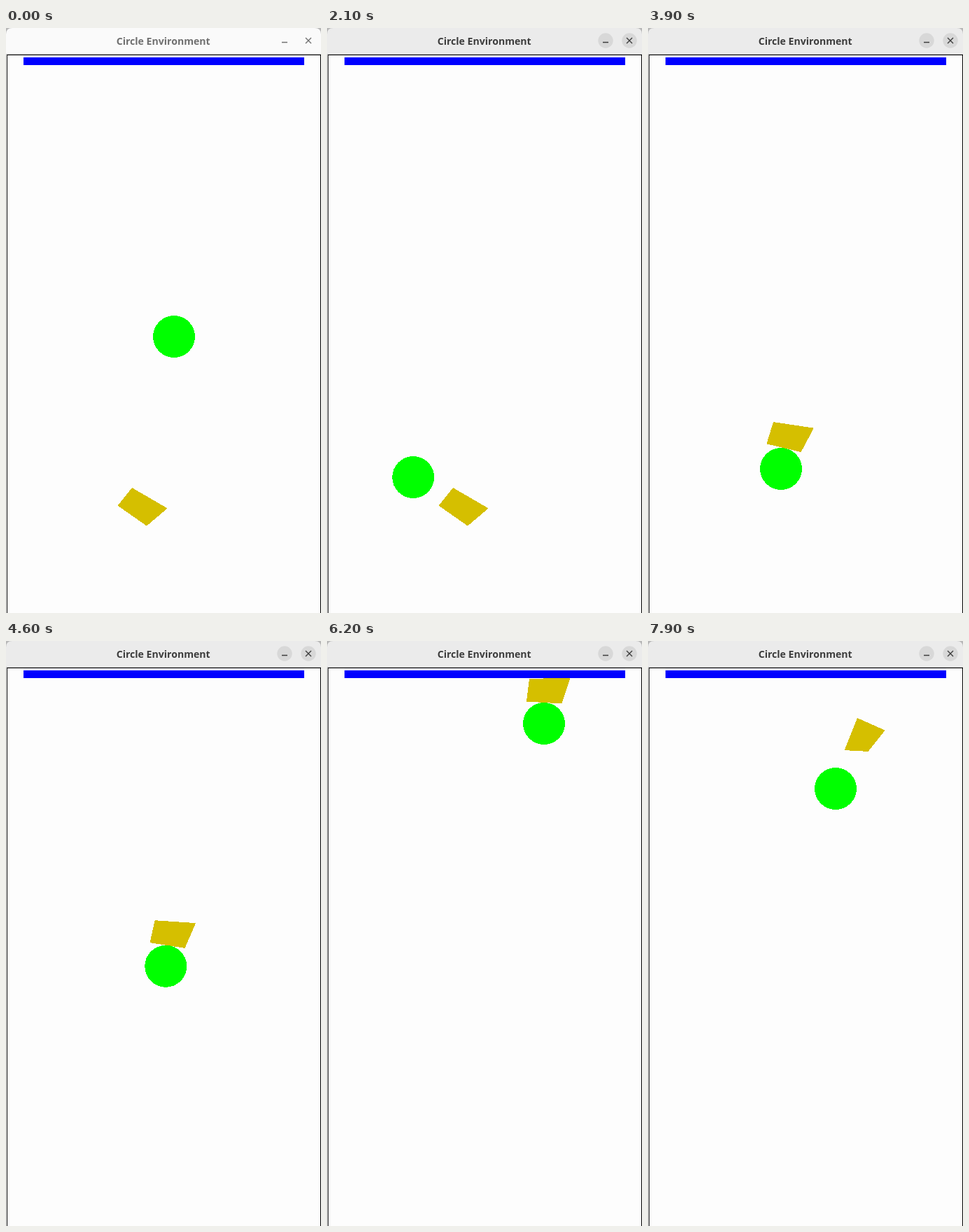
These frames come from a looping animation (450x836 px, 8000 ms). An HTML page:

```html
<!DOCTYPE html>
<html lang="en">
<head>
<meta charset="utf-8">
<title>Circle Environment</title>
<style>
  html, body { margin: 0; width: 100%; height: 100%; overflow: hidden; background: #fdfdfd; }
  svg { display: block; width: 450px; height: 836px; }
  text { font: bold 14.1px "Open Sans", "Noto Sans", sans-serif; text-anchor: middle; }
  .glyph { fill: none; stroke-width: 1.4; }
  .crisp { shape-rendering: crispEdges; }
</style>
</head>
<body>
<svg viewBox="0 0 450 836">
  <rect width="450" height="40" fill="#b8b8b8"/>
  <path id="bar" d="M0 38V9Q0 0 9 0H441Q450 0 450 9V38Z"/>
  <path d="M0 37.5H450" stroke="#c4c4c4"/>
  <g id="buttons" fill="#d8d8d8">
    <circle cx="398" cy="18" r="10.7"/>
    <circle cx="432" cy="18" r="10.7"/>
  </g>
  <text id="title" x="224.7" y="24">Circle Environment</text>
  <path id="glyphs" class="glyph" d="M394 20.5H402M428 14L436 22M436 14L428 22"/>
  <g class="crisp">
    <rect y="38" width="450" height="798" fill="#fdfdfd"/>
    <path d="M1.5 836V38.5H449.5V836" fill="none" stroke="#000"/>
    <rect x="25" y="42" width="401" height="11" fill="#00f"/>
    <polygon id="first" points="0,0 58.5,-1.5 46.5,35.5 -4,32.5" fill="#d5bf00"/>
    <polygon id="next" points="0,0 40.5,15.5 18,47 -16,47" fill="#d5bf00"/>
    <circle id="ball" r="30" fill="#0f0"/>
  </g>
</svg>
<script>
const LOOP = 8000, STEP = 100, RESET = 6400;
const el = id => document.getElementById(id);

// Turning points of the ball: [time, x, y].
const push = [
  [1000, 240, 441], [1500, 176, 510], [2250, 110, 675], [2650, 150, 762],
  [2700, 162, 755], [3330, 162, 763], [3900, 190, 630], [5400, 272, 276],
  [6060, 310, 118]
];
const retry = [
  [6400, 110, 207], [6900, 233, 116], [7100, 263, 117], [7400, 238, 150],
  [7900, 268, 211]
];
// Poses of the rigid blocks: [time, x, y, angle].
const lift = [[3480, 180, 657, 31.6], [3900, 179, 563, 10], [5400, 251, 212, 0], [6060, 289, 54, 0]];
const nudge = [[6900, 268, 108, 0], [7100, 299, 110, 3]];

const clamp = u => Math.min(1, Math.max(0, u));
const mix = (a, b, u) => a + (b - a) * u;

function sample(keys, t) {
  const next = keys.findIndex(k => k[0] > t);
  const b = keys.at(next), a = keys[Math.max(0, next - 1)];
  if (next < 1) return b.slice(1);
  const u = (t - a[0]) / (b[0] - a[0]);
  return a.slice(1).map((v, i) => mix(v, b[i + 1], u));
}

function place(id, [x, y, angle = 0]) {
  el(id).setAttribute("transform", `translate(${x} ${y}) rotate(${angle})`);
}

function grey(from, to, u) {
  const v = Math.round(mix(from, to, u));
  return `rgb(${v},${v},${v})`;
}

function draw(t) {
  const fresh = t >= RESET;
  place("ball", sample(fresh ? retry : push, t));
  place("first", sample(lift, t));
  place("next", sample(nudge, t));
  el("first").setAttribute("visibility", fresh ? "hidden" : "visible");
  el("next").setAttribute("visibility", fresh ? "visible" : "hidden");

  const focus = clamp((t - 400) / 200), ink = grey(112, 61, focus);
  el("bar").setAttribute("fill", grey(250, 235, focus));
  el("title").setAttribute("fill", ink);
  el("glyphs").setAttribute("stroke", ink);
  el("buttons").setAttribute("opacity", focus);
}

const start = performance.now();
function tick() {
  const t = (performance.now() - start) % LOOP;
  draw(Math.floor(t / STEP) * STEP);
  requestAnimationFrame(tick);
}
tick();
</script>
</body>
</html>
```
